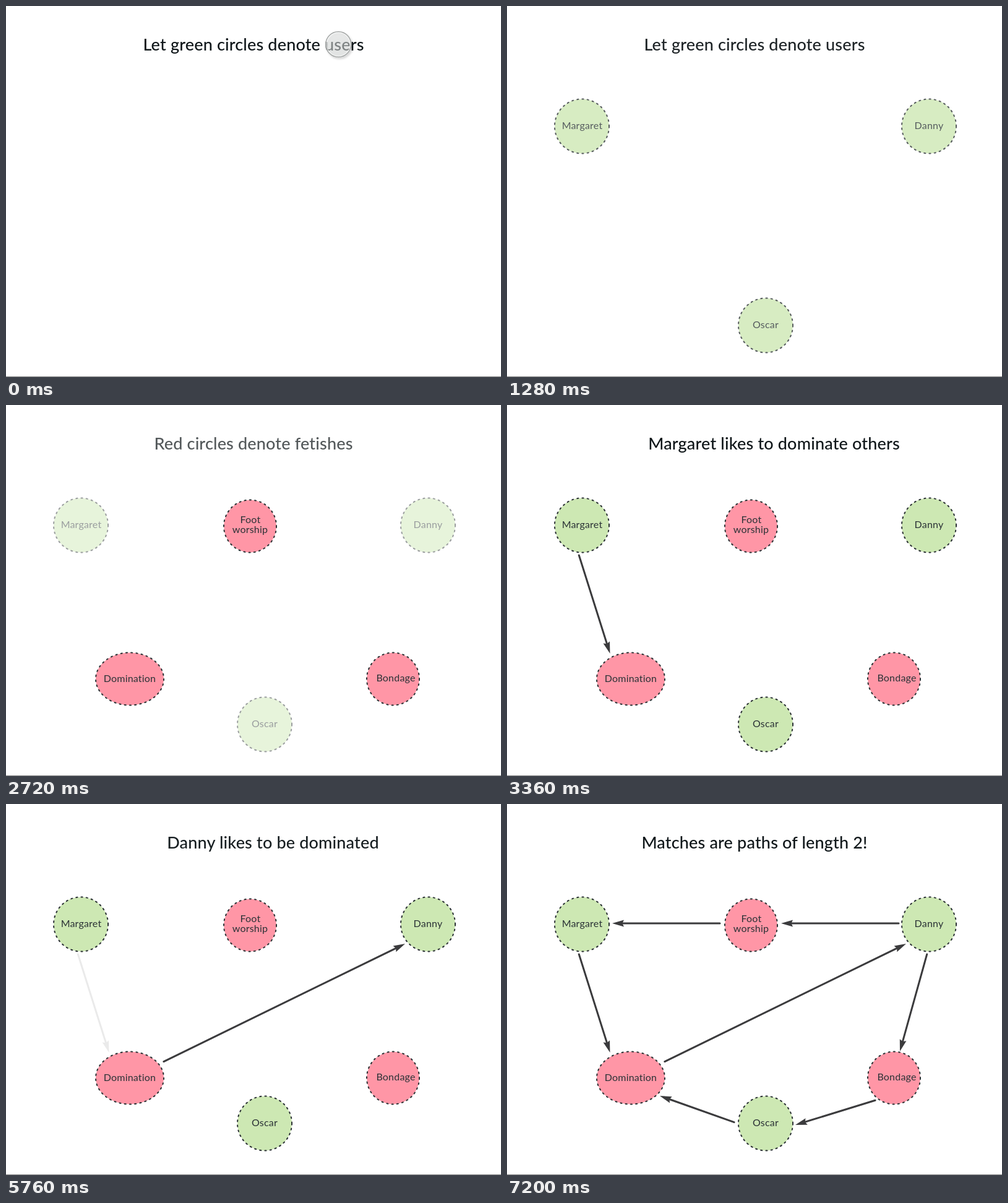
Animation, 800 px wide and 600 px high, one loop 9200 ms. Source, as an HTML page:

```html
<!DOCTYPE html>
<html lang="en">
<head>
<meta charset="utf-8">
<title>Matching graph</title>
<style>
  html, body { margin: 0; width: 100%; height: 100%; overflow: hidden; background: #fff; }
  svg { display: block; width: 800px; height: 600px; }
  text { font-family: Lato, "Open Sans", sans-serif; text-anchor: middle; }
  .title { font-size: 27px; font-weight: 500; letter-spacing: .17px; fill: #10171a; }
  .label { font-size: 16px; letter-spacing: .2px; fill: #2b3236; }
  .node { stroke: #2c3235; stroke-width: 2; stroke-linecap: round; stroke-dasharray: 2.2 6.1; }
  .user { fill: #cde8b3; }
  .fetish { fill: #ff96a6; }
  .arrow line { stroke: #3b3b3d; stroke-width: 3; stroke-linecap: round; }
  .arrow path { fill: #3b3b3d; }
</style>
</head>
<body>
<svg id="stage" viewBox="0 0 800 600">
  <defs>
    <linearGradient id="glass" x1="0" y1="0" x2="0" y2="1">
      <stop offset="0" stop-color="#dfe2e1"/>
      <stop offset="1" stop-color="#d3d6d5"/>
    </linearGradient>
    <filter id="shadow" x="-30%" y="-30%" width="170%" height="170%">
      <feDropShadow dx="2" dy="2.5" stdDeviation="1.5" flood-color="#000" flood-opacity=".2"/>
    </filter>
  </defs>
</svg>
<script>
const LOOP = 9200, STEP = 80;
const stage = document.getElementById('stage');

function add(parent, tag, attrs, content = '') {
  const el = document.createElementNS('http://www.w3.org/2000/svg', tag);
  for (const key in attrs) el.setAttribute(key, attrs[key]);
  el.textContent = content;
  return parent.appendChild(el);
}

const group = (cls = '') => add(stage, 'g', { class: cls });
const title = (content, x = 400) => add(stage, 'text', { class: 'title', x, y: 72 }, content);

function node(parent, kind, cx, cy, rx, ry, ...lines) {
  add(parent, 'ellipse', { class: 'node ' + kind, cx, cy, rx, ry });
  for (const [content, x, y] of lines) add(parent, 'text', { class: 'label', x, y }, content);
}

function arrow(parent, x1, y1, x2, y2) {
  const length = Math.hypot(x2 - x1, y2 - y1);
  const angle = Math.atan2(y2 - y1, x2 - x1) * 180 / Math.PI;
  const g = add(parent, 'g', { class: 'arrow', transform: `translate(${x1} ${y1}) rotate(${angle})` });
  add(g, 'line', { x1: 1, y1: 0, x2: length - 15, y2: 0 });
  add(g, 'path', { d: `M${length} 0l-19 -5.5l2.5 5.5l-2.5 5.5z` });
}

const users = group(), fetishes = group();
node(users, 'user', 121, 194.5, 44, 44, ['Margaret', 121.5, 199]);
node(users, 'user', 682, 194.5, 44, 44, ['Danny', 682, 199]);
node(users, 'user', 418, 516.5, 44, 44, ['Oscar', 418, 521]);
node(fetishes, 'fetish', 394.5, 196, 42.5, 42.5, ['Foot', 395, 191], ['worship', 394.5, 207]);
node(fetishes, 'fetish', 200, 443, 55, 42.5, ['Domination', 200, 448]);
node(fetishes, 'fetish', 625.5, 443, 42.5, 42.5, ['Bondage', 630, 447]);

const dominates = group(), dominated = group(), others = group();
arrow(dominates, 116, 242, 166.5, 402);
arrow(dominated, 254, 417, 645, 226);
arrow(others, 345, 193, 170, 193);
arrow(others, 634, 193, 443, 193);
arrow(others, 679, 242, 635, 400);
arrow(others, 596, 479, 466, 519);
arrow(others, 368, 515, 247, 472);

const usersTitle = title('Let green circles denote users');
const fetishTitle = title('Red circles denote fetishes');
const dominatesTitle = title('Margaret likes to dominate others', 431.5);
const dominatedTitle = title('Danny likes to be dominated', 431.5);
const matchTitle = title('Matches are paths of length 2!');

add(stage, 'rect', { x: 0, y: 599, width: 800, height: 1, fill: '#858585' });

const pointer = group();
pointer.setAttribute('filter', 'url(#shadow)');
add(pointer, 'circle', { r: 20.5, fill: 'url(#glass)', 'fill-opacity': .52, stroke: '#a3a6a5', 'stroke-width': 1.5 });
add(pointer, 'circle', { r: 19, fill: 'none', stroke: '#fff', 'stroke-width': 1.2, 'stroke-opacity': .6 });

const ramp = (t, start, end) => Math.min(1, Math.max(0, (t - start) / (end - start)));
const fade = (t, start, duration = 320) => ramp(t, start, start + duration);
const show = (el, opacity) => el.setAttribute('opacity', opacity);

function render(ms) {
  const t = Math.floor(ms % LOOP / STEP) * STEP;

  show(usersTitle, 1 - ramp(t, 1265, 1515));
  show(users, t < 2000 ? fade(t, 540) - ramp(t, 1220, 1510) : fade(t, 2570));
  show(fetishes, fade(t, 1655));
  show(fetishTitle, fade(t, 1655) - fade(t, 2630));
  show(dominatesTitle, fade(t, 3040) - fade(t, 4160));
  show(dominates, t < 5000 ? fade(t, 3040) - fade(t, 4160) : fade(t, 5728));
  show(dominatedTitle, fade(t, 4628) - fade(t, 5750));
  show(dominated, fade(t, 4628));
  show(matchTitle, fade(t, 6160));
  show(others, fade(t, 6880));

  const p = ramp(t, 240, 720), move = p * p * (3 - 2 * p);
  pointer.setAttribute('transform', `translate(${537.2 + 215 * move} ${62 - 20 * move})`);
  show(pointer, 1 - ramp(t, 560, 800));
}

const begin = performance.now();
function tick() {
  render(performance.now() - begin);
  requestAnimationFrame(tick);
}
tick();
</script>
</body>
</html>
```
